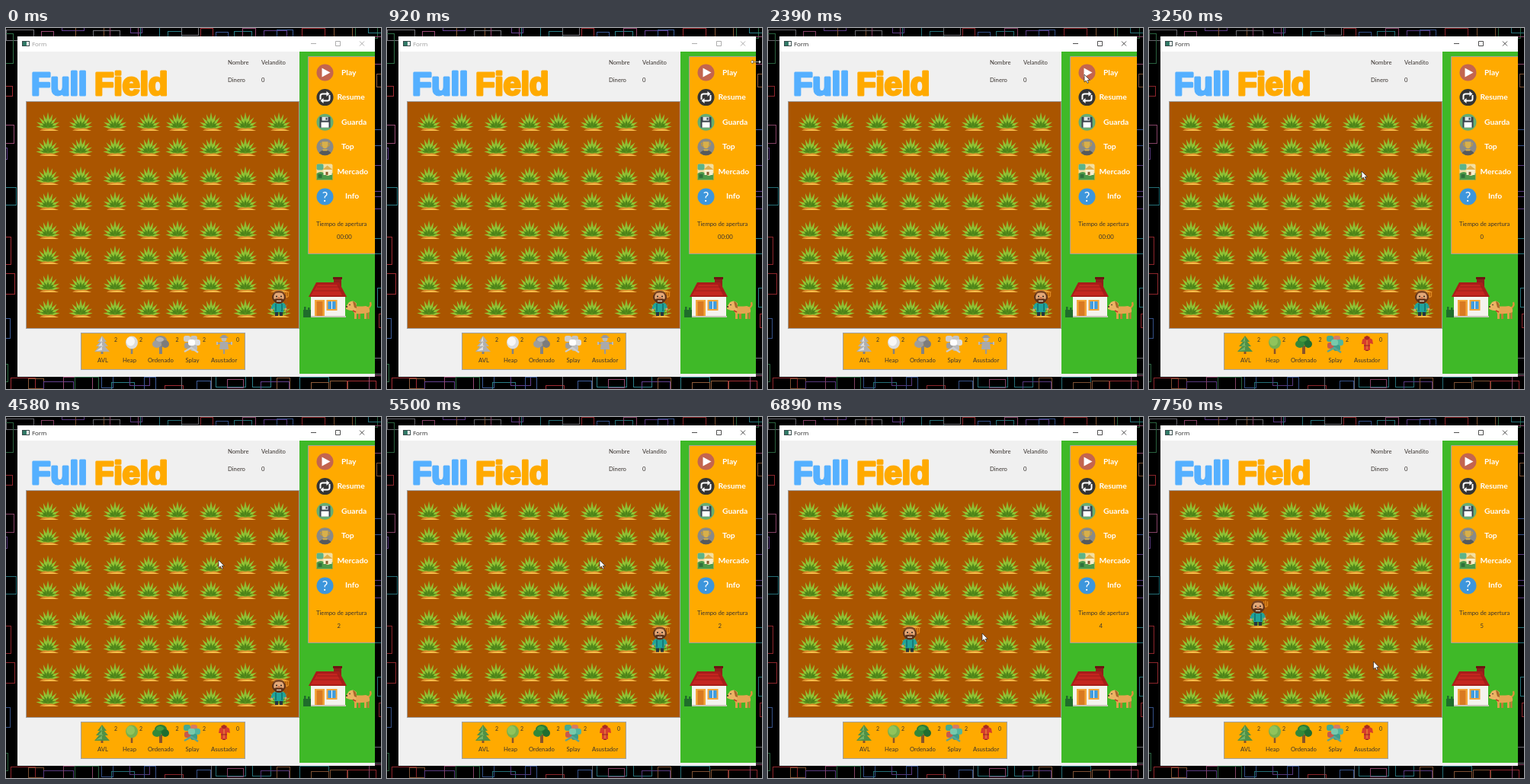
An HTML page for the animation above (8000 ms loop, 492x474 px).

```html
<!DOCTYPE html>
<html lang="es">
<head>
<meta charset="utf-8">
<title>Form</title>
<style>
html, body { margin: 0; width: 100%; height: 100%; overflow: hidden; background: #000; }
svg { display: block; width: 100%; height: 100%; }
text { font-family: Lato, sans-serif; font-size: 7.7px; fill: #3a3430; }
.menu text { font-size: 10.3px; font-weight: 700; fill: #fff; }
.bar text { font: 7.9px "Open Sans", sans-serif; fill: currentColor; }
.counts text { font-size: 7px; }
.logo { font: 700 42px "Liberation Sans", Arial, sans-serif; letter-spacing: -.4px; stroke-width: 3; stroke-linejoin: round; }
.off { filter: grayscale(1) brightness(1.4); }
</style>
</head>
<body>
<svg id="stage" viewBox="0 0 492 474" preserveAspectRatio="none"></svg>
<script>
const LOOP = 8000;
const stage = document.getElementById('stage');

const rect = (x, y, w, h, fill, more = '') => `<rect x="${x}" y="${y}" width="${w}" height="${h}" fill="${fill}" ${more}/>`;
const disc = (x, y, r, fill, more = '') => `<circle cx="${x}" cy="${y}" r="${r}" fill="${fill}" ${more}/>`;
const oval = (x, y, rx, ry, fill) => `<ellipse cx="${x}" cy="${y}" rx="${rx}" ry="${ry}" fill="${fill}"/>`;
const path = (d, fill, more = '') => `<path d="${d}" fill="${fill}" ${more}/>`;
const line = (d, stroke, w = 1) => path(d, 'none', `stroke="${stroke}" stroke-width="${w}"`);
const text = (x, y, s, more = '') => `<text x="${x}" y="${y}" ${more}>${s}</text>`;
const at = (x, y, body) => `<g transform="translate(${x} ${y})">${body}</g>`;

let seed = 29;
const rnd = () => (seed = (seed * 16807) % 2147483647) / 2147483647;

// Wallpaper: outlined boxes, crowded above and below the window, sparse beside it
function wallpaper() {
  const inks = ['#a02b32', '#2b7f88', '#63408f', '#75757c', '#964a72', '#2f6f47', '#3c5c9a', '#8d5b3a'];
  let out = '';
  const box = (x, y, w, h) => {
    const ink = inks[Math.floor(rnd() * inks.length)];
    out += rect(Math.round(x) + .5, Math.round(y) + .5, Math.round(w), Math.round(h), 'none', `stroke="${ink}"`);
  };
  for (let i = 0; i < 22; i++) {
    box(i * 22 + rnd() * 18, -14 + rnd() * 20, 14 + rnd() * 24, 9 + rnd() * 16);
    box(i * 22 + rnd() * 18, 452 + rnd() * 18, 14 + rnd() * 26, 10 + rnd() * 22);
  }
  for (let i = 0; i < 9; i++) {
    box(-25 + rnd() * 12, i * 52 + rnd() * 30, 18 + rnd() * 18, 12 + rnd() * 30);
    box(478 + rnd() * 12, i * 52 + rnd() * 30, 18 + rnd() * 18, 12 + rnd() * 30);
  }
  return out;
}

function blade(deg, len, w, fill) {
  const a = deg * Math.PI / 180, s = Math.sin(a), c = Math.cos(a);
  const pt = (u, v) => `${(s * u + c * v).toFixed(1)} ${(8 - c * u + s * v).toFixed(1)}`;
  return path(`M${pt(0, 0)}L${pt(len * .5, -w)} ${pt(len, 0)} ${pt(len * .5, w)}Z`, fill);
}

function plant() {
  const fan = (angles, len, droop, w, fill) =>
    angles.map(d => blade(d, len - Math.abs(d) * droop, w, fill)).join('');
  return path('M-11 12Q-4 6 4 8L14 12Z', '#d98a2b') + path('M-8 12Q2 8 14 12Z', '#f8c04a') +
    oval(0, 4, 6, 5, '#7fae2b') +
    fan([-84, -63, -40, -19, 19, 40, 63, 84], 20, .05, 1.9, '#93c435') +
    blade(0, 20.5, 2.2, '#8cbd34') +
    fan([-74, -30, 30, 74], 12.5, .02, 1.4, '#568c1c') +
    fan([-52, 0, 52], 10, 0, 1.7, '#4c8319');
}

function field() {
  const xs = [55, 98, 143, 187, 225, 269, 314, 358];
  const ys = [123, 156, 194, 227, 265, 298, 335, 368];
  return ys.map(y => xs.map(x => `<use href="#plant" x="${x}" y="${y}"/>`).join('')).join('');
}

function farmer() {
  return line('M22 8V31', '#a5561a', 1.3) +
    line('M19.5 2V8Q22 11 24.5 8V2M22 1V9', '#e08a22', 1.3) +
    rect(7, 27, 4, 7, '#26333f') + rect(13, 27, 4, 7, '#26333f') +
    path('M4 18Q12 14 20 18L22 24 19 26 18 22V29H6V22L4 27 1 25Z', '#1fa39c') +
    line('M8 18V28M16 18V28', '#14706f', 1.6) +
    disc(2.7, 26, 1.6, '#dfa070') + disc(21, 25, 1.6, '#dfa070') +
    oval(12, 9.5, 9, 7.5, '#5d3219') + oval(12, 9.5, 6.8, 7, '#e3a878') +
    path('M4 6Q5 1 12 1T20 6L16 4Q12 3 8 4Z', '#7b4522') +
    disc(9, 8.5, 1, '#222') + disc(15, 8.5, 1, '#222') + disc(12, 10.5, 1.6, '#cc7448') +
    path('M5 13Q8 10 12 12 16 10 19 13 18 18 12 18T5 13Z', '#5d3219') +
    line('M9 14.5H15', '#f0e2cf', 1.2);
}

function house() {
  return rect(430, 328, 10, 14, '#8f1f1a') + rect(429, 327, 12, 3, '#6d1512') +
    rect(400, 350, 45, 30, '#f5f3ee') +
    path('M397 353L407 334H437L447 353Z', '#a81d19') +
    path('M400 351L409 337H434L441 351Z', '#c42620') +
    line('M404 345H442M408 340H438', '#951a17', .8) +
    rect(405, 357, 13, 22, '#f4a63a') + rect(407.5, 359, 8, 20, '#d97a22') +
    rect(420.5, 357, 14, 14, '#f4a63a') + rect(422.5, 359, 10, 10, '#3f9de0') +
    line('M427.5 359V369', '#fff') + rect(399, 378, 47, 2, '#c9c4ba') +
    rect(390, 370, 10, 10, '#1f6d2b') + rect(391, 366, 2.5, 5, '#1f6d2b') + rect(396, 367, 2.5, 4, '#1f6d2b');
}

function dog() {
  return line('M474 368Q480 366 478 360', '#dc9238', 2.4) +
    rect(457, 372, 3, 10, '#dfa04a') + rect(462, 373, 3, 9, '#bd7c34') +
    rect(470, 372, 3, 10, '#dfa04a') + rect(474, 371, 2.6, 11, '#bd7c34') +
    path('M453 365Q464 366 472 365 478 366 477 373 470 376 457 375Z', '#e5a550') +
    path('M446 366L450 360Q456 356 460 362L459 371Q452 372 446 369Z', '#ecb364') +
    path('M455 359Q460 359 460 368L457 367Z', '#a9682a') +
    disc(447, 366, 1.1, '#3a2a20') + disc(451, 363.5, .8, '#222') + line('M455 371L459 373', '#c23b2d', 1.6);
}

function menu() {
  const icons = [
    disc(0, 0, 11, '#c3654f') + path('M-4 -6L7 0-4 6Z', '#fff'),
    disc(0, 0, 11, '#343434') + line('M-6 3V-2Q-6 -4.5 -3 -4.5H3M6 -3V2Q6 4.5 3 4.5H-3', '#fff', 2) +
      path('M2 -8L6 -4.5 2 -1ZM-2 8L-6 4.5-2 1Z', '#fff'),
    disc(0, 0, 11, '#65ad73') + rect(-7, -7, 14, 14, '#39434c', 'rx="1"') +
      rect(-4, -7, 8, 5, '#e1e5e8') + rect(-5, 0, 10, 7, '#fff') + rect(1, -6, 2, 3, '#39434c'),
    disc(0, 0, 11, '#8a8a86') + path('M-8 8Q0 -1 8 8Q0 14 -8 8Z', '#565a5c') +
      path('M-4 -7H4V-2Q3 2 0 2T-4 -2Z', '#d9b04a') +
      line('M-4 -5H-6Q-6 -1 -3 -1M4 -5H6Q6 -1 3 -1', '#c79a35', 1.2) + rect(-3, 3, 6, 2, '#d9b04a'),
    rect(-11, -10.5, 21, 21, '#f3dfa0', 'rx="2"') + rect(-11, -10.5, 9, 8, '#5cb38a', 'rx="2"') +
      path('M-11 2Q-4 -2 0 3T10 1V10.5H-11Z', '#4c9a4a') + path('M-2 -3L3 -8 9 -3V4H-2Z', '#f8efcd') +
      path('M-3 -3L3 -8.5 10 -3Z', '#e0b04a') + rect(-9, 3, 5, 5, '#2f6f3a') + rect(1, 0, 3, 4, '#8b5a2c'),
    disc(0, 0, 11, '#3d96dc') + text(0, 6, '?', 'text-anchor="middle" style="font-size:17px;font-weight:400"')
  ];
  const labels = [['Play', 440], ['Resume', 434.5], ['Guarda', 440], ['Top', 440], ['Mercado', 434.5], ['Info', 445]];
  return labels.map(([s, x], i) =>
    at(418.5, 58.5 + i * 32.6, icons[i]) + text(x, 61.5 + i * 32.5, s)).join('');
}

function trees() {
  const trunk = (x, w = 3) => rect(x - w / 2, 417, w, 11, '#87552c');
  const splay = [[-6, -6, '#46aa91'], [3, -6, '#d57b62'], [7, -1, '#52b69e'], [-5, 3, '#c65a4c'], [3, 6, '#3d9c88'], [0, -1, '#77c9ac']];
  return trunk(126) +
    path('M126 404L132 412H129L134 418H130L136 425H116L122 418H118L123 412H120Z', '#4f9147') +
    path('M126 405L123 412 127 411 121 418 128 417 118 424 126 423Z', '#79b364') +
    trunk(165, 2.5) + oval(165, 413, 8, 8.5, '#77b04e') + oval(163.5, 411.5, 5.5, 6, '#90c35b') +
    trunk(203, 4) + oval(203, 410, 8, 6, '#287c36') + oval(198, 415, 6, 5, '#32883a') +
    oval(209, 415, 5, 5, '#1f6e31') + oval(202, 409, 5, 3, '#459c40') +
    splay.map(([x, y, c]) => rect(239 + x, 410 + y, 9, 8, c, 'rx="3"')).join('') +
    line('M234 425L243 420 252 426', '#59a493', 2.4);
}

const scarecrow = line('M277 414H296M286 409V428', '#999', 2) + path('M281 412H291L292 422H280Z', '#aaa') +
  disc(286, 408, 3.5, '#bbb') + path('M280 407L284 403H288L292 407Z', '#999') +
  line('M277 412V416M296 412V416', '#bbb', 2);
const coat = rect(284, 420, 4, 4, '#8f291f') +
  path('M280 409L286 405 293 409 294 415 290 414V423H282V415L279 415Z', '#d63d2c') +
  path('M282 406L286 404 290 406 288 409H284Z', '#a82a22') + line('M286 410V422', '#f1a13a') +
  line('M282 417H290', '#8f291f');

function scene() {
  const edge = 'stroke="#a0a0a0" stroke-width="1"';
  const names = [['AVL', 120], ['Heap', 153], ['Ordenado', 186], ['Splay', 235.5], ['Asustador', 269]];
  const counts = [[142, 2], [175, 2], [222.5, 2], [258, 2], [302, 0]];
  return `<defs><g id="plant">${plant()}</g></defs>` +
    rect(0, 0, 492, 474, '#000') + `<g id="wall">${wallpaper()}</g>` +
    rect(15, 11, 469, 447, '#f0f0f0') + rect(15, 11, 469, 20, '#fff') +
    `<g id="bar" class="bar">` +
    rect(21.5, 17.5, 9, 6, '#fff', 'stroke="#394b4b"') + rect(22, 18, 5, 5, '#317a67') +
    text(34, 24, 'Form') +
    line('M400 20.5H407M432.5 17.5H438.5V23.5H432.5ZM464 17.5L470 23.5M470 17.5L464 23.5', 'currentColor', .8) + '</g>' +
    text(33, 88, 'Full', 'class="logo" style="fill:#55b0ff;stroke:#55b0ff"') +
    text(116, 88, 'Field', 'class="logo" style="fill:#fa0;stroke:#fa0"') +
    text(291, 48, 'Nombre') + text(335, 48, 'Velandito') + text(291, 70.5, 'Dinero') + text(335, 70.5, '0') +
    rect(385, 31, 99, 423, '#3fb928') + rect(26.5, 96.5, 358, 298, '#a50', edge) +
    path('M484 37.5H396.5V296.5H484', '#fa0', edge) + `<g class="menu">${menu()}</g>` +
    text(407, 260, 'Tiempo de apertura') + '<text id="clock" y="276.5"></text>' +
    house() + dog() + field() + `<g id="farmer">${farmer()}</g>` +
    rect(98.5, 400.5, 215, 48, '#fa0', edge) +
    `<g id="trees">${trees()}</g><g id="idle">${scarecrow}</g><g id="ready">${coat}</g>` +
    names.map(([s, x]) => text(x, 439, s)).join('') +
    `<g class="counts">${counts.map(([x, n]) => text(x, 411.5, n)).join('')}</g>` +
    `<g id="arrow">${path('M0 0V10L2.3 8 4 11.4 5.6 10.7 4.2 7.4H7.3Z', '#fff', 'stroke="#222" stroke-width=".7"')}</g>` +
    `<g id="resize">${path('M477 44.5L480 42V44H488V42L491 44.5 488 47V45H480V47Z', '#fff', 'stroke="#222" stroke-width=".5"')}</g>` +
    `<g id="busy">${disc(278.5, 188.5, 6.5, 'none', 'stroke="#2a9bd8" stroke-width="3"')}</g>`;
}

stage.innerHTML = scene();
const el = {};
stage.querySelectorAll('[id]').forEach(n => { el[n.id] = n; });
const show = (n, on) => n.setAttribute('display', on ? 'inline' : 'none');
const move = (n, x, y) => n.setAttribute('transform', `translate(${x.toFixed(2)} ${y.toFixed(2)})`);
const passed = (times, t) => times.filter(s => t >= s).length;

// Pointer moves: start, end, steps, x, y
const moves = [
  [1320, 1700, 6, 424, 61], [1860, 2010, 3, 415, 61], [2940, 3250, 5, 279, 188],
  [6360, 6890, 7, 281, 284], [6960, 7140, 3, 293, 321], [7210, 7210, 1, 294.5, 321]
];
function pointer(t) {
  let x = 484, y = 45;
  for (const [from, to, n, tx, ty] of moves) {
    if (t < from) break;
    const gap = (to - from) / (n - 1) || 1;
    const k = Math.min(n, Math.floor((t - from) / gap + 1.001)) / n;
    x += (tx - x) * k;
    y += (ty - y) * k;
  }
  return [x, y];
}

const upSteps = [4960, 5500, 7670];
const leftSteps = [5820, 6200, 6580, 6890, 7350];
const ticks = [3570, 4580, 5580, 6550, 7520];

function draw(t) {
  const active = t >= 2390, playing = t >= 2580;
  const busy = (t >= 3400 && t < 3570) || (t >= 5110 && t < 5190);
  el.bar.style.color = active ? '#222' : '#999';
  el.wall.setAttribute('opacity', active ? .88 : 1);
  el.trees.setAttribute('class', playing ? '' : 'off');
  show(el.idle, !playing);
  show(el.ready, playing);
  el.clock.setAttribute('x', playing ? 434.5 : 434);
  el.clock.textContent = playing ? passed(ticks, t) : '00:00';
  move(el.farmer, 346 - 43 * passed(leftSteps, t), 344 - 34.7 * passed(upSteps, t));
  move(el.arrow, ...pointer(t));
  show(el.arrow, t >= 1320 && !busy);
  show(el.resize, t >= 920 && t < 1320);
  show(el.busy, busy);
}

const start = performance.now();
function frame() {
  draw((performance.now() - start) % LOOP);
  requestAnimationFrame(frame);
}
frame();
</script>
</body>
</html>
```
